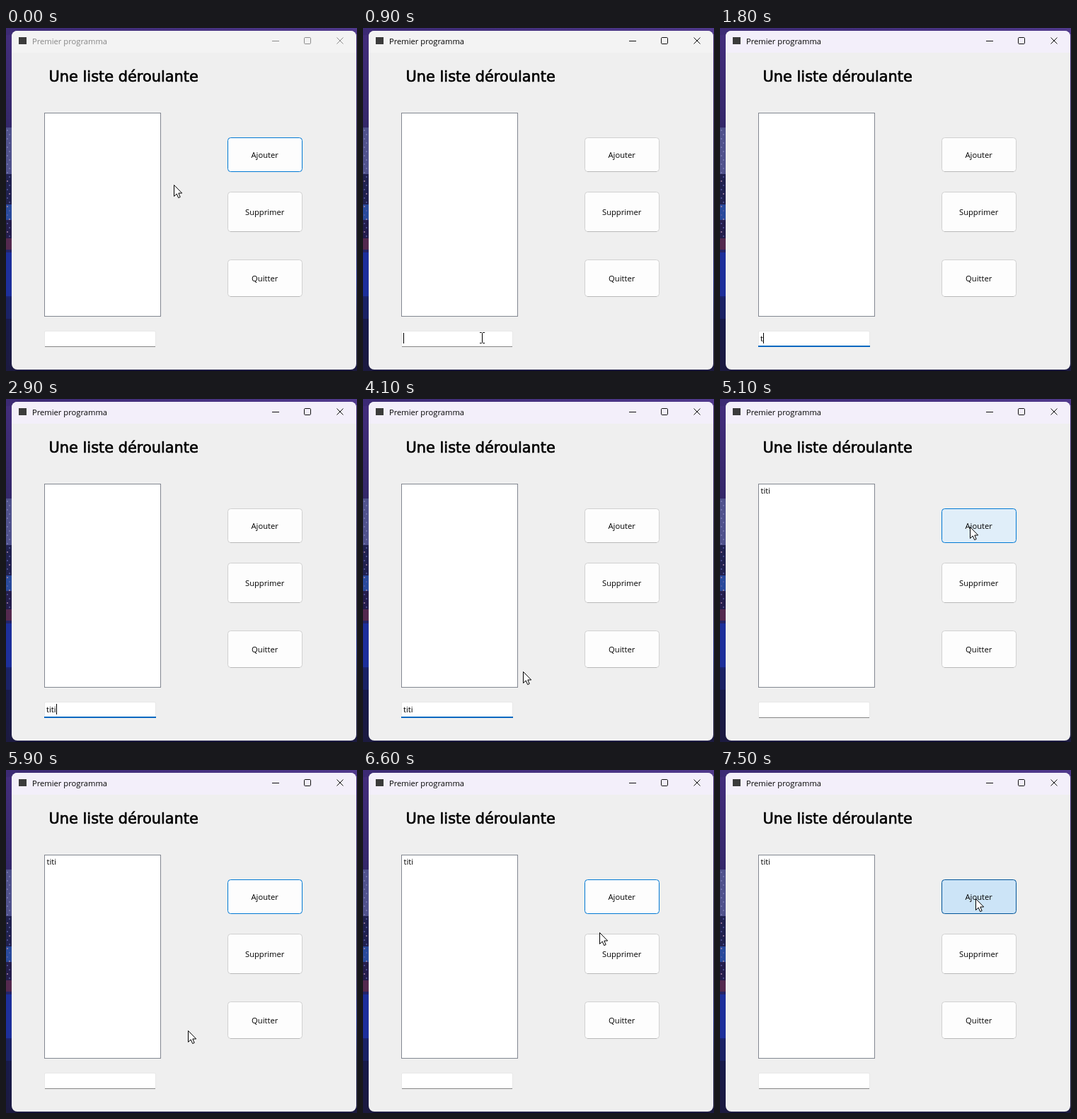
Write an HTML page that moves like this. It is 496 px wide and 486 px high and loops after 8 s.

```html
<!DOCTYPE html>
<html lang="fr">
<head>
<meta charset="utf-8">
<title>Premier programma</title>
<style>
  html, body { margin: 0; width: 100%; height: 100%; overflow: hidden; background: #1b1b45; }
  svg { display: block; width: 496px; height: 486px; }
  text { font: 11.2px "Open Sans", "Noto Sans", sans-serif; fill: #000; white-space: pre; }
  #heading { font: 20.9px "DejaVu Sans", sans-serif; stroke: #000; stroke-width: .65px; }
  .button text { text-anchor: middle; }
  .button rect { fill: #fdfdfd; stroke: #d0d0d0; }
  .button path { stroke: #b9b9b9; }
  .focus rect { stroke: #0078d4; }
  .hover rect { fill: #e0eef9; stroke: #0078d4; }
  .press rect { fill: #cce4f7; stroke: #005499; }
  .focus path, .hover path, .press path { display: none; }
</style>
</head>
<body>
<svg viewBox="0 0 496 486">
  <defs>
    <linearGradient id="night" x2="0" y2="1">
      <stop offset="0" stop-color="#432d7c"/>
      <stop offset=".27" stop-color="#35286b"/>
      <stop offset=".45" stop-color="#20204f"/>
      <stop offset=".6" stop-color="#2a2050"/>
      <stop offset=".73" stop-color="#1d2b8c"/>
      <stop offset=".85" stop-color="#171a4a"/>
      <stop offset="1" stop-color="#1c1a40"/>
    </linearGradient>
    <linearGradient id="top"><stop stop-color="#3c2a74"/><stop offset="1" stop-color="#50398c"/></linearGradient>
  </defs>
  <rect width="496" height="486" fill="url(#night)"/>
  <rect width="496" height="10" fill="url(#top)"/>
  <g id="city"></g>

  <rect x="8" y="4" width="487" height="480" rx="8" fill="#efefef"/>
  <path id="bar" d="M8 35V12a8 8 0 0 1 8-8H487a8 8 0 0 1 8 8V35Z"/>
  <rect x="18" y="13" width="11" height="10" fill="#3b3b3b"/>
  <text id="caption" x="37" y="23">Premier programma</text>
  <g id="controls" fill="none">
    <path d="M376 18.5h10M467.5 13.5l9 9m0-9l-9 9"/>
    <rect x="421.5" y="13.5" width="9" height="9" rx="1.2"/>
  </g>

  <text id="heading" x="60.5" y="76">Une liste déroulante</text>
  <rect x="54.5" y="120.5" width="164" height="288" fill="#fff" stroke="#828790"/>
  <text id="item" x="57.5" y="134">titi</text>

  <rect x="54.5" y="429.5" width="157" height="22" rx="1.5" fill="#fff" stroke="#e8e8e8"/>
  <rect id="underline" x="55"/>
  <text id="entry" x="57" y="444"></text>
  <path id="caret" stroke="#000"/>

  <g id="buttons"></g>

  <path id="arrow" d="M.5 .5V16.5L4.2 13L6.7 18.6L9.2 17.5L6.8 12H11.7Z" fill="#fff" stroke="#000"/>
  <path id="beam" d="M-3.5 -7.5H-1L0 -6.5L1 -7.5H3.5M0 -6.5V6.5M-3.5 7.5H-1L0 6.5L1 7.5H3.5" fill="none" stroke="#000"/>
</svg>
<script>
const LOOP = 8000, STEP = 100;
const $ = id => document.getElementById(id);
const set = (el, attrs) => { for (const k in attrs) el.setAttribute(k, attrs[k]); };
const show = (el, on) => set(el, { visibility: on ? "visible" : "hidden" });
const clamp = v => Math.min(1, Math.max(0, v));

// Skyline beside the window: y, height, colour
$("city").innerHTML = [
  [141, 66, "#50528c"], [207, 42, "#20214f"], [250, 22, "#294a9c"],
  [274, 24, "#241d4c"], [298, 16, "#54294f"], [318, 62, "#1d2f9b"], [382, 30, "#1a2265"]
].map(([y, h, c]) => `<rect y="${y}" width="8" height="${h}" fill="${c}"/>`).join("")
  + Array.from({ length: 26 }, (_, i) =>
    `<rect x="${1 + i * 3 % 6}" y="${144 + i * 6}" width="2" height="2" fill="${i < 11 ? "#7d7eb4" : i % 3 ? "#5b5fa6" : "#b08ba8"}" opacity=".7"/>`).join("");

$("buttons").innerHTML = [["Ajouter", 155, 49], ["Supprimer", 232, 57], ["Quitter", 328, 53]]
  .map(([label, y, h]) => `<g class="button">
    <rect x="313.5" y="${y + .5}" width="105" height="${h - 1}" rx="4"/>
    <path d="M317 ${y + h - .5}H415"/>
    <text x="365.7" y="${Math.floor(y + h / 2) + 5}">${label}</text></g>`).join("");
const addButton = $("buttons").firstElementChild;

// Pointer stops: time, x, y
const pointerPath = [
  [0, 237, 222], [100, 237, 222], [700, 168, 439], [3500, 168, 439], [3700, 195, 439],
  [3900, 195, 439], [4600, 349, 171], [4800, 353, 181], [5400, 353, 181],
  [5900, 257, 369], [6200, 257, 369], [6800, 361, 182], [LOOP, 361, 182]
];
const caretToggles = [800, 1400, 1800, 3000, 3500, 4000, 4500, 4900];
const keyTimes = [1800, 2000, 2200, 2400];

function pointerAt(t) {
  const i = pointerPath.findIndex(p => p[0] > t);
  const [t0, x0, y0] = pointerPath[i - 1], [t1, x1, y1] = pointerPath[i];
  const u = (t - t0) / (t1 - t0), e = u * u * (3 - 2 * u);
  return [Math.round(x0 + (x1 - x0) * e), Math.round(y0 + (y1 - y0) * e)];
}

function mix(a, b, u) {
  return `rgb(${a.map((v, i) => Math.round(v + (b[i] - v) * u))})`;
}

function render(t) {
  const active = t >= 800, editing = t >= 800 && t < 4900;
  const blue = t >= 1000 && t < 4900, added = t >= 5000;

  set($("bar"), { fill: mix([243, 243, 243], [243, 239, 250], clamp((t - 900) / 400)) });
  $("caption").style.fill = active ? "#000" : "#858585";
  set($("controls"), { stroke: active ? "#111" : "#8c8c8c" });

  const typed = added ? 0 : keyTimes.filter(k => t >= k).length;
  $("entry").textContent = "titi".slice(0, typed);
  show($("item"), added);
  set($("underline"), blue
    ? { x: 54, y: 450, width: 158, height: 2, fill: "#0067c0" }
    : { x: 55, y: 451, width: 156, height: 1, fill: "#868686" });
  const caretX = 57.5 + [0, 4, 7, 11, 14][typed];
  set($("caret"), { d: `M${caretX} 432V447` });
  show($("caret"), caretToggles.filter(c => t >= c).length % 2);

  const [x, y] = pointerAt(t);
  const overEntry = x >= 54 && x < 212 && y >= 429 && y < 452;
  const overAdd = x >= 313 && x < 419 && y >= 155 && y < 204;
  const pressed = t === 4900 || t >= 7500;
  addButton.setAttribute("class", "button" + (!editing ? " focus" : "")
    + (overAdd ? " hover" : "") + (pressed ? " press" : ""));

  const visible = t < 1800 || t >= 3500;
  show($("arrow"), visible && !overEntry);
  show($("beam"), visible && overEntry);
  set($("arrow"), { transform: `translate(${x} ${y})` });
  set($("beam"), { transform: `translate(${x + .5} ${y})` });
}

const start = performance.now();
function tick() {
  const t = (performance.now() - start) % LOOP;
  render(Math.floor(t / STEP) * STEP);
  requestAnimationFrame(tick);
}
tick();
</script>
</body>
</html>
```
